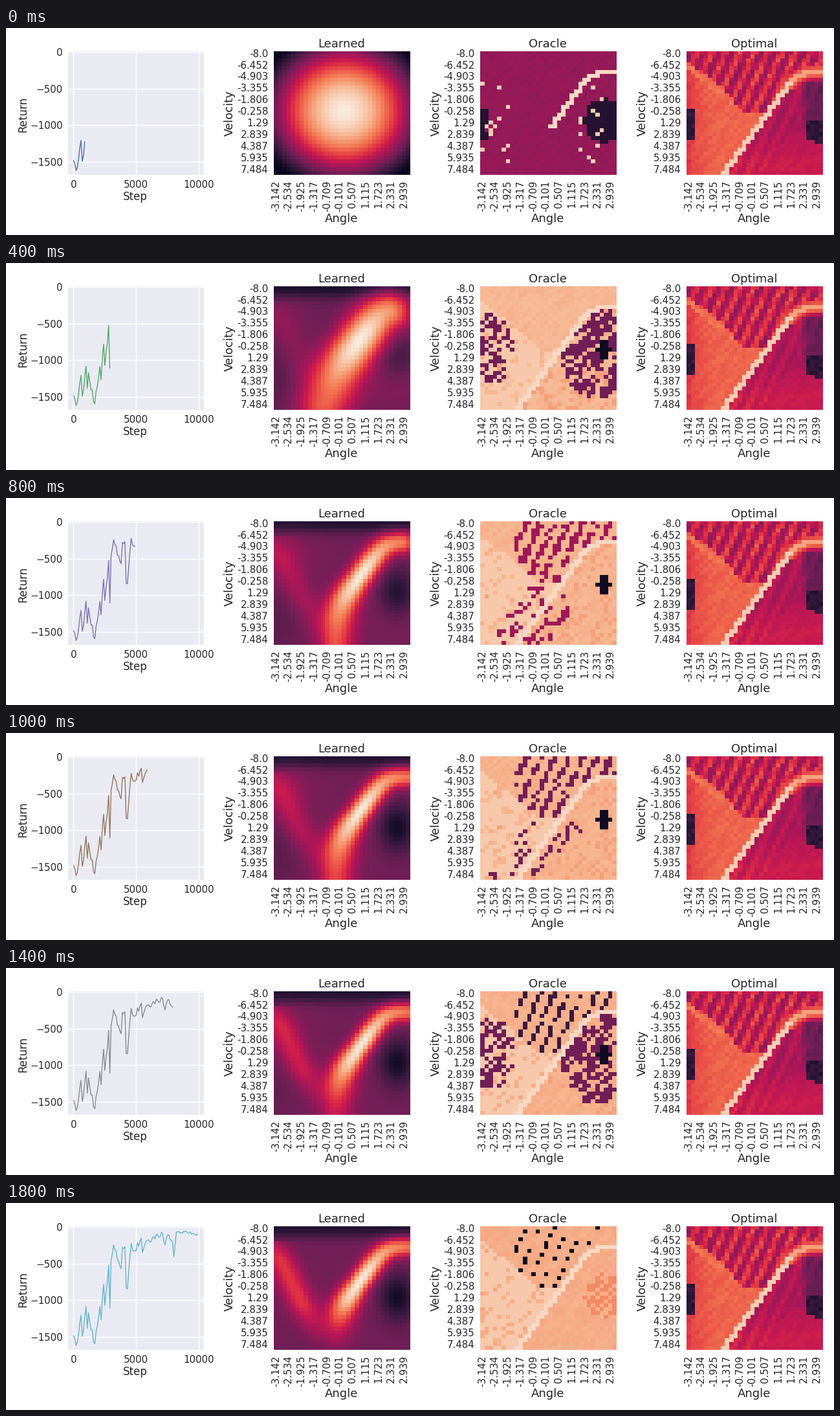
These frames come from a looping animation (1280x320 px, 2000 ms). A matplotlib script:

```python
import numpy as np
import matplotlib.pyplot as plt
from matplotlib.animation import FuncAnimation
from matplotlib.colors import LinearSegmentedColormap

W, H, DPI = 1280, 320, 100
N, FRAMES = 32, 10
TOP, BOTTOM = 35.6, 226.8
INK = "#262626"
plt.rcParams["font.family"] = "DejaVu Sans"

ROCKET = LinearSegmentedColormap.from_list("rocket", [
    (0, "#03051a"), (1 / 7, "#35193e"), (2 / 7, "#701f57"), (3 / 7, "#ad1759"),
    (0.5, "#cb1b4f"), (4 / 7, "#e13342"), (5 / 7, "#f37651"),
    (6 / 7, "#f6b48f"), (1, "#faebdd")], N=256)
LINE_COLORS = ["#4c72b0", "#dd8452", "#55a868", "#c44e52", "#8172b3",
               "#937860", "#da8bc3", "#8c8c8c", "#ccb974", "#64b5cd"]

R, C = np.mgrid[0:N, 0:N].astype(float)


# ---- helpers ----
def softplus(x, s):
    return s * np.log1p(np.exp(x / s))


def bump(c, r, a, b):
    return np.exp(-((C - c) / a) ** 2 - ((R - r) / b) ** 2)


def ramp(x):
    return np.clip(x, 0, 1)


def streaks(seed):
    """Uniform noise that clumps along the rising diagonal."""
    n = np.random.default_rng(seed).random((N, N))
    n = n + 0.7 * np.roll(n, (1, -1), (0, 1))
    return n.ravel().argsort().argsort().reshape(N, N) / N ** 2


def returns():
    """Key episodes, joined by lines with shrinking noise between them."""
    keys = [(0, 1480), (3, 1575), (6, 1205), (7, 1490), (10, 1080), (11, 1380),
            (12, 1170), (17, 1590), (21, 1085), (22, 1265), (24, 780), (25, 1070),
            (28, 525), (29, 1105), (30, 450), (32, 245), (38, 570), (39, 280),
            (41, 272), (42, 838), (43, 842), (46, 225), (49, 330), (54, 155),
            (55, 350), (58, 195), (71, 90), (73, 248), (75, 110), (79, 210),
            (80, 405), (82, 70), (99, 100)]
    steps, values = np.transpose(keys)
    episode = np.arange(100)
    noise = np.random.default_rng(4).uniform(-1, 1, 100) * (75 - 0.55 * episode)
    noise[steps] = 0
    return -np.interp(episode, steps, values) - noise


# ---- regions shared by the oracle and optimal maps ----
def crest_row(c):
    """The bright ridge: a straight climb that levels off at the top right."""
    return 5 + 1.5 * softplus(25.6 - c, 1.2)


CREST_C = np.linspace(7, 31, 120)[:, None, None]
CREST_R = crest_row(CREST_C)
CREST_DIST = np.sqrt(((C - CREST_C) ** 2 + (R - CREST_R) ** 2).min(axis=0))
RIDGE = CREST_DIST < 0.72
ABOVE = R < crest_row(C)
BELOW = ~ABOVE
V_ROW = np.minimum(3.5 + 0.9 * C, 16)
SKY = ABOVE & (R < V_ROW)
WEDGE = ABOVE & ~SKY
ARM = (abs(R - V_ROW) < 1.1) & (C < 11)
WAVE = np.cos(2 * np.pi * (C + 0.42 * R - 13.6) / 3.3)
BAND = (CREST_DIST < 6) & (R > 16)
WEST = bump(1.5, 15.5, 6.2, 9.5) > 0.37
EAST = BELOW & (bump(27, 17, 8.5, 12) > 0.37)
HOLLOW = bump(28.5, 17.5, 4.6, 5.8)
EDGE = (C < 2) & (R > 14) & (R < 23)
CORE = bump(28.5, 16, 1.6, 2.2) > 0.37


def optimal():
    n = streaks(90) - 0.5
    ground = (0.44 + 0.04 * n + 0.06 * ramp((R - 20) / 8)
              + 0.04 * WAVE * (CREST_DIST < 7)
              - 0.16 * ramp((C - 26) / 2) * ramp((21 - R) / 4))
    field = np.where(SKY, 0.49 - 0.11 * WAVE + 0.12 * n, ground)
    field = np.where(WEDGE, 0.68 + 0.05 * n - 0.1 * np.exp(-C / 3), field)
    field[ARM] = 0.7 + 0.08 * n[ARM]
    pit = (C > 27) & (bump(30, 20, 2.6, 3) + 0.3 * n > 0.37)
    field = np.where(EDGE | pit, 0.13 + 0.1 * n, field)
    field = np.maximum(field, 0.74 * np.exp(-(CREST_DIST / 2.8) ** 2) * (R < 10))
    field[RIDGE] = np.where(R < 8, 0.82, 0.92)[RIDGE]
    return field


def oracle(i):
    noise = (streaks(20 * i + k) for k in range(20))
    trained, patchy, last = i > 1, i % 5 == 2, i == FRAMES - 1
    field = (0.87 if trained else 0.375) + 0.03 * (next(noise) - 0.5)

    def scatter(region, density, level):
        field[region & (next(noise) < density)] = level

    shade = np.interp(i, [0, 1, 3, 5, 9], [0.1, 0.2, 0.5, 0.3, 0.02])
    if trained:
        settle = i / (FRAMES - 1)
        field[ABOVE | BELOW] -= 0.03 * settle
        scatter(BELOW | WEST, 0.3 * (1 - settle), 0.81)
        scatter(WEDGE, 0.8, 0.91)
        if patchy:
            scatter(EAST, 0.62, 0.29)
            scatter(WEST, 0.5, 0.29)
        if i > 2:
            scatter(SKY & (C > 7) & (WAVE > np.interp(i, [3, 9], [-0.2, 0.88])), 0.8, shade)
            scatter(BAND, 0.3 * ramp((7 - i) / 3), shade)
        scatter(HOLLOW > 0.37, 0.6 * last, 0.76)
    elif i == 1:
        scatter(SKY, 0.5, shade)
        scatter(BELOW, 0.3, 0.14)
        scatter(WEDGE, 0.15, 0.17)
        scatter((SKY & (WAVE > 0) & (C > 6)) | ARM, 0.7, 0.91)
    else:
        scatter(EDGE, 0.8, shade)
        scatter(HOLLOW > 0.37, 0.97, shade)
        scatter((R > 7) & ((C < 7) | (C > 22)), 0.05, 0.92)
    field[RIDGE & (trained | (i == 1) | (R < 20))] = 0.95
    if trained and not last:
        field[CORE] = 0.37 if i == 3 else 0.04
    return field


def learned(i):
    """A round hill that stretches along the crest and sharpens with training."""
    t = i / (FRAMES - 1)
    ripe = min(1, i / 5)
    ground = (0.29 - 0.9 * np.exp(-1.8 * i)
              - 0.2 * ramp(i / 2) * np.exp(-(R / 2.6) ** 2)
              - 0.24 * ripe * bump(28.5, 18, 4, 6)
              + 0.14 * ripe * (1 - t) * bump(3, 8, 6, 7)
              - 0.12 * ripe * (1 - t) * bump(0, 25, 5, 8)
              + 0.12 * ramp(i / 2) * (1 - ripe) * bump(29, 26, 8, 7))
    arm = np.exp(-((C - 0.45 * (R - 6)) / 3.6) ** 2) * ramp(1.6 - abs(R - 14) / 10)
    ground = ground + 0.28 * t * arm * (R > 3)

    # The foot of the ridge bends upright as training goes on.
    c = np.linspace(8, 25 + 6 * ripe, 100)[:, None, None]
    r = crest_row(c)
    c = c + (14 + softplus(c - 14, 1.5) - c) * min(1, i / 4)
    grow = 1 - np.exp(-1.2 * i)
    c, r = 16 + (c - 16) * grow, 15 + (r - 15) * grow
    peak_dist = np.hypot(c - 19.5 + 3.5 * np.exp(-i), r - 13.5)
    level = 0.65 + 0.35 * np.exp(-(peak_dist / 11) ** 2)
    level = level - 0.35 * t ** 3 * ramp((r - 19) / 10)
    width = (2.5 + 19 * np.exp(-i)) * (1 + 0.6 * ripe * ramp((r - 15) / 10))
    hill = np.exp(-((C - c) ** 2 + (R - r) ** 2) / width ** 2)
    return np.clip((ground + (level - ground) * hill).max(axis=0), 0.02, 1)


# ---- layout, in pixels from the top left ----
fig = plt.figure(figsize=(W / DPI, H / DPI), dpi=DPI, facecolor="white")


def panel(x, width):
    ax = fig.add_axes([x / W, 1 - BOTTOM / H, width / W, (BOTTOM - TOP) / H])
    for spine in ax.spines.values():
        spine.set_visible(False)
    return ax


def caption(x, y, text, size, rotation=0):
    fig.text(x / W, 1 - y / H, text, size=size, color=INK, ha="center",
             va="baseline", rotation=rotation, rotation_mode="anchor")


def heatmap(x, title, field):
    ax = panel(x, 211)
    image = ax.imshow(field, cmap=ROCKET, vmin=0, vmax=1, aspect="auto",
                      interpolation="nearest")
    ticks = np.arange(0, N, 3)
    angle, speed = np.linspace(-np.pi, np.pi, N), np.linspace(-8, 8, N)
    ax.set_xticks(ticks, [str(round(angle[t], 3)) for t in ticks], rotation=90)
    ax.set_yticks(ticks, [str(round(speed[t], 3)) for t in ticks])
    ax.tick_params(length=0, pad=6.2, labelsize=10.8, labelcolor=INK)
    caption(x + 104.5, 30, title, 13)
    caption(x + 105, 299.5, "Angle", 13)
    caption(x - 63, 132, "Velocity", 13, 90)
    return image


curve = panel(96, 210)
curve.set_facecolor("#eaeaf2")
curve.set(xlim=(-430, 10400), ylim=(-1672, 11))
curve.set_xticks([0, 5000, 10000])
curve.set_yticks([0, -500, -1000, -1500])
curve.tick_params(length=0, pad=6, labelsize=10.8, labelcolor=INK)
curve.grid(color="white", lw=1)
curve.set_axisbelow(True)
line, = curve.plot([], [], lw=1.0, solid_capstyle="round")
caption(200, 266.5, "Step", 12)
caption(31, 133, "Return", 12, 90)

RETURNS = returns()
LEARNED = [learned(i) for i in range(FRAMES)]
ORACLE = [oracle(i) for i in range(FRAMES)]
learned_image = heatmap(414, "Learned", LEARNED[0])
oracle_image = heatmap(733, "Oracle", ORACLE[0])
heatmap(1052, "Optimal", optimal())


def update(i):
    count = 10 * (i + 1)
    line.set_data(100 * np.arange(count), RETURNS[:count])
    line.set_color(LINE_COLORS[i])
    learned_image.set_data(LEARNED[i])
    oracle_image.set_data(ORACLE[i])
    return line, learned_image, oracle_image


animation = FuncAnimation(fig, update, frames=FRAMES, interval=200, repeat=True,
                          repeat_delay=0, blit=False)
plt.show()
```
